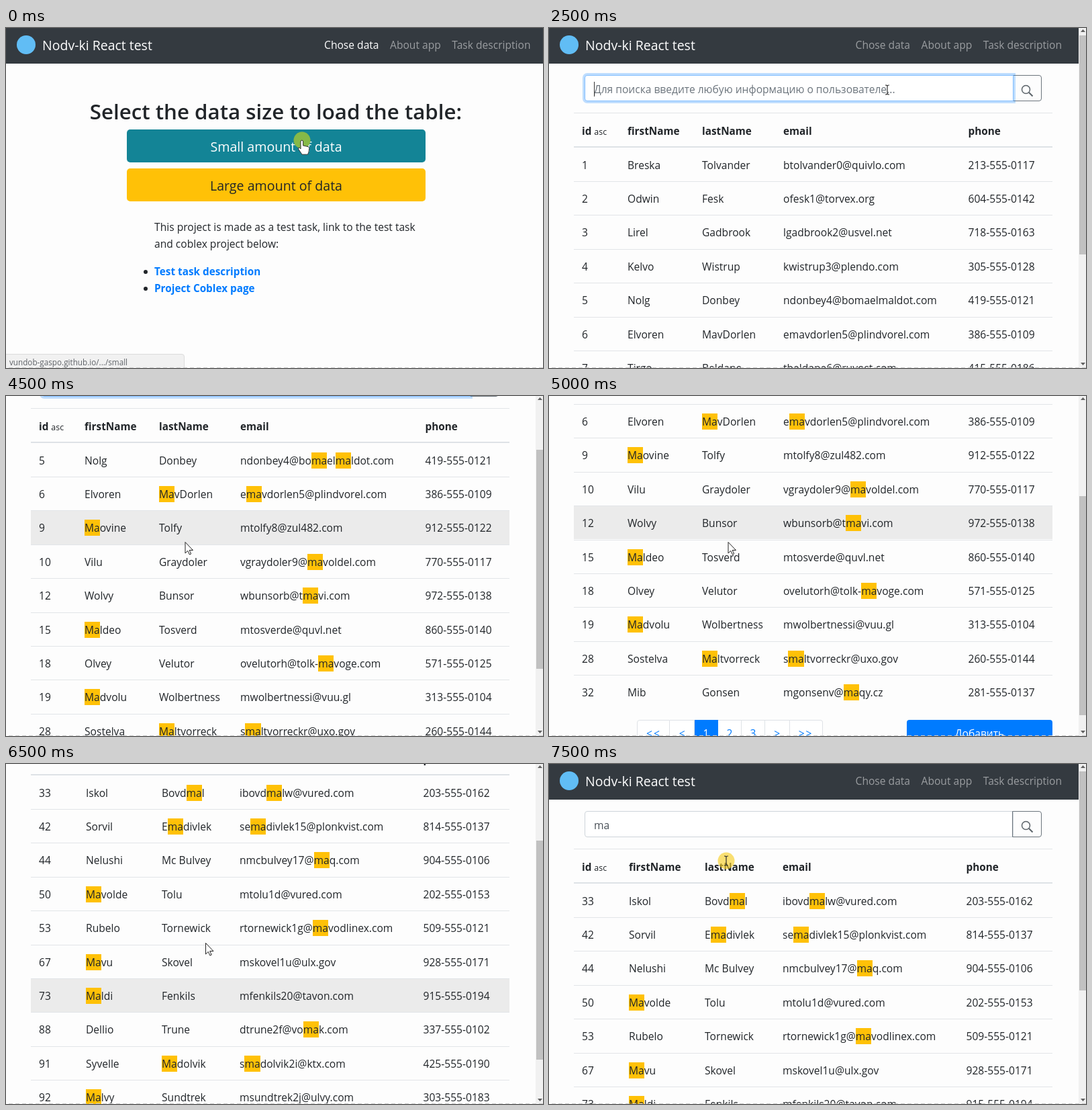
Write an HTML page that moves like this. It is 800 by 506 pixels and loops after 8000 ms.

```html
<!DOCTYPE html>
<html lang="en">
<head>
<meta charset="utf-8">
<title>Data table demo</title>
<style>
  html, body { margin: 0; width: 100%; height: 100%; overflow: hidden; background: #fdfdfd; }
  body { font: 15.6px/25px "Open Sans", "Noto Sans", sans-serif; color: #212529; }
  #stage { position: relative; width: 800px; height: 506px; overflow: hidden; }
  #stage div, #stage svg { position: absolute; box-sizing: border-box; white-space: pre; }
  #stage svg, #page, #home, #grid, #table { left: 0; top: 0; }
  #page, #home, #grid, #table { width: 800px; }
  #nav { left: 0; top: 0; width: 800px; height: 53px; background: #343a40; color: #fff; }
  #logo { left: 16px; top: 11px; width: 28px; height: 28px; border-radius: 50%; background: #61bdf5; }
  #brand { left: 54px; top: 12px; font-size: 19.5px; line-height: 27px; }
  #links { top: 13px; display: flex; gap: 16.5px; color: rgba(255,255,255,.5); }
  #links .on { color: #fff; }
  #home h1 { position: absolute; left: 2px; top: 104px; width: 800px; margin: 0; text-align: center;
             font-size: 31.3px; font-weight: 600; line-height: 40px; }
  .big { left: 180px; width: 445px; height: 49.5px; border-radius: 5px; text-align: center;
         font-size: 19.6px; line-height: 51px; }
  .link { left: 221px; color: #007bff; font-size: 15.3px; font-weight: 700; }
  .link::before { content: ""; position: absolute; left: -16.5px; top: 10px; width: 6px; height: 6px;
                  border-radius: 50%; background: #212529; }
  #status { left: -1px; top: 484.5px; width: 267px; height: 23px; border: 1px solid #dcdcdc; border-radius: 0 4px 0 0;
            background: #f1f1f1; color: #5f6368; padding-left: 5px; font-size: 11.7px; line-height: 22px; }
  #input { left: 53px; top: 69.5px; width: 639px; height: 39.5px; border: 1px solid #ced4da; border-radius: 4px 0 0 4px;
           background: #fff; color: #495057; padding-left: 13px; line-height: 41px; }
  #input.focus { border-color: #80bdff; box-shadow: 0 0 0 3px rgba(0,123,255,.25); z-index: 1; }
  #hint { left: 13px; top: 0; color: #6c757d; }
  #caret { top: 9.5px; width: 1px; height: 21.5px; background: #333; }
  #find { left: 690px; top: 69.5px; width: 44px; height: 39.5px; border: 1px solid #6c757d; border-radius: 0 4px 4px 0; }
  .row { left: 37px; width: 713px; height: 50.4px; border-top: 1px solid #e2e5e8; line-height: 51.5px; }
  .row.hover { background: #ebebeb; }
  .row.head { border-bottom: 2px solid #dee2e6; height: 52px; line-height: 53px; font-weight: 700; font-size: 15.3px; }
  .row small { font-size: 12.4px; font-weight: 400; }
  mark { background: #ffc107; color: inherit; padding: 1px 0; }
  #pager { left: 19.5px; width: 500px; top: 698px; height: 39px; display: flex; justify-content: center; }
  #pager span { box-sizing: border-box; flex: none; width: 35px; border: 1px solid #dee2e6; border-left-width: 0; background: #fff;
                color: #007bff; text-align: center; line-height: 39px; }
  #pager .one { width: 36.6px; }
  #pager .two { width: 49px; letter-spacing: 2px; }
  #pager span:first-child { border-left-width: 1px; border-radius: 4px 0 0 4px; }
  #pager span:last-child { border-radius: 0 4px 4px 0; }
  #pager .on { background: #007bff; border-color: #007bff; color: #fff; }
  #pager .ring { box-shadow: 0 0 0 3px rgba(0,123,255,.25); z-index: 1; }
  #pager .hover { background: #e9ecef; }
  #add { left: 533px; top: 698px; width: 217px; height: 39px; border-radius: 4px; background: #007bff; color: #fff;
         text-align: center; line-height: 40px; }
  #bar { left: 789px; top: 0; width: 11px; height: 506px; background: #f1f1f1; }
  #thumb { left: 1px; width: 10px; height: 326px; background: #c1c1c1; }
  #dashes { left: 0; top: 505px; width: 800px; height: 1px;
            background: repeating-linear-gradient(90deg, #cbcbcb 0 6px, transparent 6px 10px) 4px 0; }
</style>
</head>
<body>
<div id="stage">
  <div id="page">
    <div id="nav">
      <div id="logo"></div>
      <div id="brand">Nodv-ki React test</div>
      <div id="links"><span id="chose">Chose data</span><span>About app</span><span>Task description</span></div>
    </div>
    <div id="home">
      <h1>Select the data size to load the table:</h1>
      <div class="big" style="top:150.5px;background:#138496;color:#fff">Small amount of data</div>
      <div class="big" style="top:208.5px;background:#ffc107">Large amount of data</div>
      <div style="left:221px;top:284px">This project is made as a test task, link to the test task
and coblex project below:</div>
      <div class="link" style="top:350px">Test task description</div>
      <div class="link" style="top:375px">Project Coblex page</div>
    </div>
    <div id="grid">
      <div id="input"><span id="query"></span><div id="hint">Для поиска введите любую информацию о пользователе...</div><div id="caret"></div></div>
      <div id="find"><svg width="42" height="38" fill="none" stroke="#5a6268" stroke-width="1.5">
        <circle cx="19.5" cy="20.5" r="6"/><path d="M24 25l5.5 5.5" stroke-width="2"/></svg></div>
      <div id="table"></div>
      <div id="pager"></div>
      <div id="add">Добавить</div>
    </div>
  </div>
  <div id="bar">
    <div id="thumb"></div>
    <svg width="11" height="506" fill="#606060"><path d="M3 6l3.5-4 3.5 4zM3 498l3.5 4 3.5-4z"/></svg>
  </div>
  <div id="status">vundob-gaspo.github.io/.../small</div>
  <div id="dashes"></div>
  <svg width="800" height="506">
    <g id="spinner" fill="none" stroke-width="16">
      <path d="M-58 0A58 58 0 0 1 0 -58" stroke="#cca616"/>
      <path d="M58 0A58 58 0 0 1 0 58" stroke="#149cbe"/>
    </g>
    <g id="cursor"><circle id="halo" r="12.5"/><path id="pointer" stroke-linejoin="round"/></g>
  </svg>
</div>
<script>
const $ = id => document.getElementById(id);
const LOOP = 8000, STEP = 500, ROW = 50.4, TABLE_TOP = 178;

const parse = text => text.trim().split("\n").map(line => line.split("|"));
const pages = {
  all: parse(`
1|Breska|Tolvander|btolvander0@quivlo.com|213-555-0117
2|Odwin|Fesk|ofesk1@torvex.org|604-555-0142
3|Lirel|Gadbrook|lgadbrook2@usvel.net|718-555-0163
4|Kelvo|Wistrup|kwistrup3@plendo.com|305-555-0128
5|Nolg|Donbey|ndonbey4@bomaelmaldot.com|419-555-0121
6|Elvoren|MavDorlen|emavdorlen5@plindvorel.com|386-555-0109
7|Tirgo|Beldane|tbeldane6@ruvost.com|415-555-0186`),
  first: parse(`
5|Nolg|Donbey|ndonbey4@bomaelmaldot.com|419-555-0121
6|Elvoren|MavDorlen|emavdorlen5@plindvorel.com|386-555-0109
9|Maovine|Tolfy|mtolfy8@zul482.com|912-555-0122
10|Vilu|Graydoler|vgraydoler9@mavoldel.com|770-555-0117
12|Wolvy|Bunsor|wbunsorb@tmavi.com|972-555-0138
15|Maldeo|Tosverd|mtosverde@quvl.net|860-555-0140
18|Olvey|Velutor|ovelutorh@tolk-mavoge.com|571-555-0125
19|Madvolu|Wolbertness|mwolbertnessi@vuu.gl|313-555-0104
28|Sostelva|Maltvorreck|smaltvorreckr@uxo.gov|260-555-0144
32|Mib|Gonsen|mgonsenv@maqy.cz|281-555-0137`),
  second: parse(`
33|Iskol|Bovdmal|ibovdmalw@vured.com|203-555-0162
42|Sorvil|Emadivlek|semadivlek15@plonkvist.com|814-555-0137
44|Nelushi|Mc Bulvey|nmcbulvey17@maq.com|904-555-0106
50|Mavolde|Tolu|mtolu1d@vured.com|202-555-0153
53|Rubelo|Tornewick|rtornewick1g@mavodlinex.com|509-555-0121
67|Mavu|Skovel|mskovel1u@ulx.gov|928-555-0171
73|Maldi|Fenkils|mfenkils20@tavon.com|915-555-0194
88|Dellio|Trune|dtrune2f@vomak.com|337-555-0102
91|Syvelle|Madolvik|smadolvik2i@ktx.com|425-555-0190
92|Malvy|Sundtrek|msundtrek2j@ulvy.com|303-555-0183`)
};
const columns = { first: [49, 117, 228, 349, 624.5], second: [49, 119, 232, 348, 621.5] };
columns.all = columns.first;

const shapes = {
  arrow: { d: "M0 0V16.5l3.8-3.6 2.6 5.6 2.3-1-2.5-5.5h5.3z", fill: "#fff", stroke: "#222", width: 1 },
  hand: { d: "M-2 2a1.8 1.8 0 0 1 3.6 0v6l7.4 1.6q2 .5 1.8 2.6l-1 6-1.3 3H0l-5.5-8.2q-.6-2.4 2-1.6l1.5 1.6z",
          fill: "#fff", stroke: "#333", width: 1 },
  beam: { d: "M-3-7q3 0 3 1.5q0-1.5 3-1.5M0-5.5V5.5M-3 7q3 0 3-1.5q0 1.5 3 1.5", fill: "none", stroke: "#333", width: 1.2 }
};
const YELLOW = "rgba(255,255,0,.5)", AMBER = "rgba(247,208,40,.65)", GREEN = "#86b948";

// start, shape, tip x, tip y, halo
const cursors = [
  [0, "hand", 441, 167, GREEN],
  [500, "arrow", 441, 167, YELLOW],
  [1500, "arrow", 507.5, 408, YELLOW],
  [2000, "beam", 504, 92, YELLOW],
  [2500, "beam", 504, 92, "none"],
  [4000, "arrow", 267, 217.5, "none"],
  [5500, "hand", 268, 472, YELLOW],
  [6000, "arrow", 297.5, 266.5, "none"],
  [7500, "beam", 264, 144, AMBER]
];
const hovers = [[0, ""], [4000, "5"], [4500, "9"], [5000, "12"], [5500, ""], [6000, "73"], [7500, ""]];
const queries = [[0, ""], [3000, "m"], [3500, "ma"]];
const scrolls = [[4000, 0], [5000, 216], [5500, 245], [6000, 245], [7000, 77], [7500, 0]];

const current = (list, t) => list.filter(item => item[0] <= t).pop();

function along(keys, t) {
  if (t <= keys[0][0]) return keys[0][1];
  for (let i = 1; i < keys.length; i++) {
    const [a, from] = keys[i - 1], [b, to] = keys[i];
    if (t <= b) return from + (to - from) * (t - a) / (b - a);
  }
  return keys[keys.length - 1][1];
}

function drawTable(name, hover) {
  const xs = columns[name];
  const cells = texts => texts.map((text, i) => `<div style="left:${xs[i] - 37}px;top:0">${text}</div>`).join("");
  const highlight = text => name === "all" ? text : text.replace(/ma/gi, "<mark>$&</mark>");
  const head = ["id <small>asc</small>", "firstName", "lastName", "email", "phone"];
  $("table").innerHTML = `<div class="row head" style="top:126px">${cells(head)}</div>` +
    pages[name].map((row, i) =>
      `<div class="row ${row[0] === hover ? "hover" : ""}" style="top:${TABLE_TOP + ROW * i - (i ? 0.5 : 0)}px;` +
      `${i ? "" : "border-color:transparent"}">${cells(row.map(highlight))}</div>`).join("");
}

function drawPager(name, overTwo) {
  const second = name === "second";
  const labels = ["<<", "<", "1", "2", "3", ...(second ? ["4"] : []), ">", ">>"];
  $("pager").innerHTML = labels.map(label => {
    let kind = /[<>]/.test(label) ? (label.length > 1 ? "two" : "one") : "";
    if (label === (second ? "2" : "1")) kind = second ? "on ring" : "on";
    else if (label === "2" && overTwo) kind = "hover";
    return `<span class="${kind}">${label.replace(/</g, "&lt;")}</span>`;
  }).join("");
}

function drawCursor(t) {
  const [, name, x, y, halo] = current(cursors, t);
  const shape = shapes[name], pointer = $("pointer");
  $("cursor").setAttribute("transform", `translate(${x} ${y})`);
  $("halo").setAttribute("fill", halo);
  pointer.setAttribute("d", shape.d);
  pointer.setAttribute("fill", shape.fill);
  pointer.setAttribute("stroke", shape.stroke);
  pointer.setAttribute("stroke-width", shape.width);
}

function show(id, visible) { $(id).style.display = visible ? "" : "none"; }

function render(t) {
  const home = t < 500, grid = t >= 2000, focus = t >= 2500 && t < 5500;
  const name = t < 4000 ? "all" : t < 6000 ? "first" : "second";
  const scroll = along(scrolls, t);

  show("home", home);
  show("status", home);
  show("spinner", !home && !grid);
  show("grid", grid);
  show("bar", grid);
  $("chose").className = home ? "on" : "";
  $("links").style.right = (grid ? 36 : 18.5) + "px";
  $("page").style.transform = `translateY(${-scroll}px)`;
  $("thumb").style.top = 11 + scroll * 0.637 + "px";
  $("spinner").setAttribute("transform", `translate(402 206.5) rotate(${9.5 + (t - 1500) * 0.3})`);

  if (grid) {
    const query = current(queries, t)[1];
    $("input").className = focus ? "focus" : "";
    $("query").textContent = query;
    show("hint", !query);
    show("caret", focus);
    $("caret").style.left = 13 + $("query").offsetWidth + "px";
    drawTable(name, current(hovers, t)[1]);
    drawPager(name, t === 5500);
  }
  drawCursor(t);
}

let shown = -1;
function tick(now) {
  const t = Math.floor(now % LOOP / STEP) * STEP;
  if (t !== shown) render(shown = t);
  requestAnimationFrame(tick);
}
render(shown = 0);
requestAnimationFrame(tick);
</script>
</body>
</html>
```
